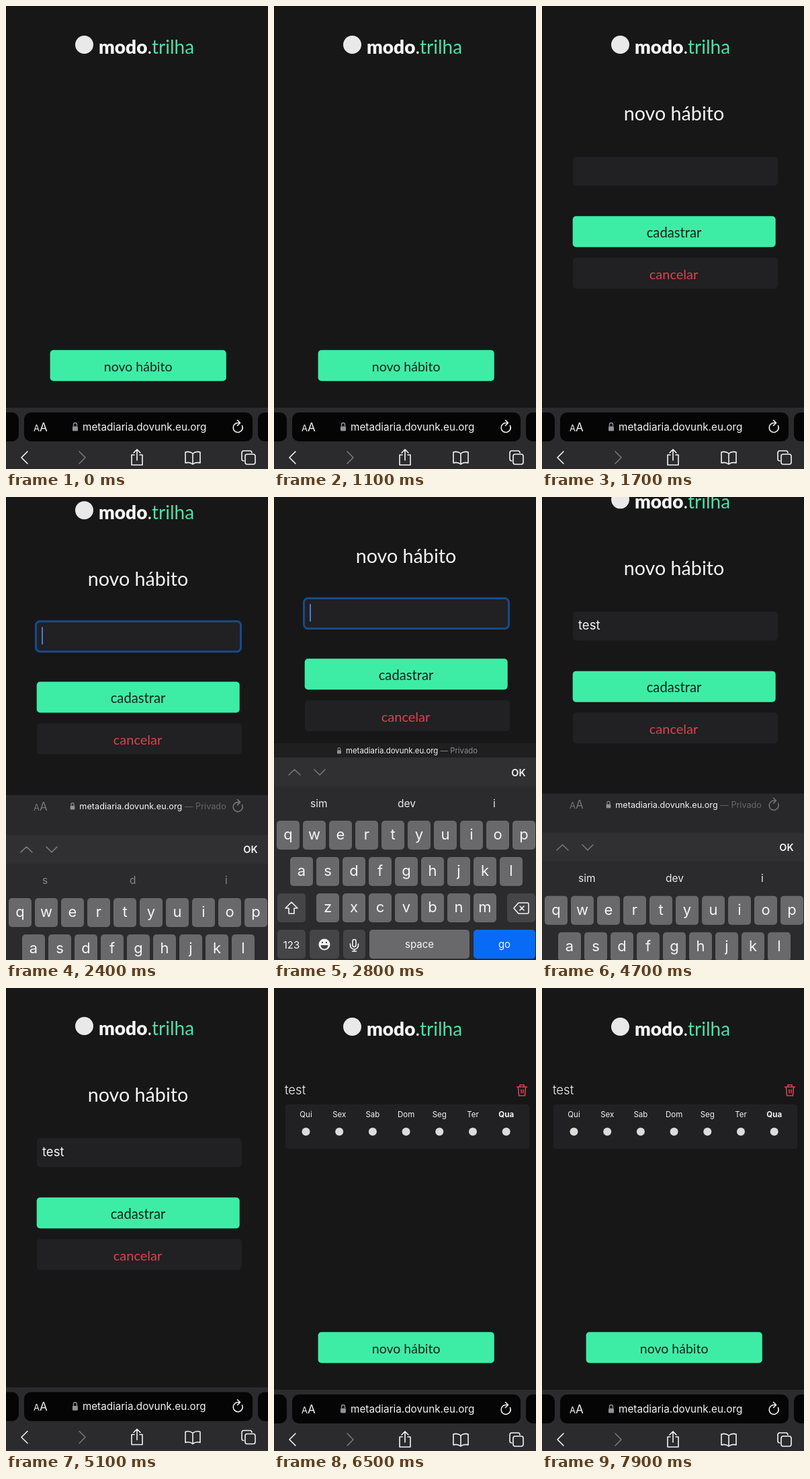
An HTML page that plays this animation: 390 px wide and 688 px high, repeating every 8000 ms.

```html
<!DOCTYPE html>
<html lang="pt">
<head>
<meta charset="utf-8">
<title>novo hábito</title>
<style>
html, body { margin: 0; width: 100%; height: 100%; overflow: hidden; background: #171718; }
svg { display: block; width: 100%; height: 100%; }
text { font-family: Inter, Roboto, sans-serif; fill: #f4f4f4; white-space: pre; }
.lato { font-family: Lato, "Open Sans", sans-serif; }
.mid { text-anchor: middle; }
.line { fill: none; stroke: #f4f4f4; stroke-width: 1.6; stroke-linecap: round; stroke-linejoin: round; }
.dim { stroke: #77777a; }
.red { stroke: #d8434f; }
</style>
</head>
<body>
<svg viewBox="0 0 390 688">
  <rect width="390" height="688" fill="#171718"/>
  <g id="page">
    <circle cx="116.5" cy="57.5" r="13.5" fill="#e9e9ea"/>
    <text class="lato" x="138" y="71" font-size="28"><tspan font-weight="900">modo</tspan>.<tspan fill="#4be0a8">trilha</tspan></text>
    <g id="home"></g>
    <g id="list"></g>
    <g id="form"></g>
  </g>
  <g id="bar">
    <rect id="barBack" y="597" width="390" height="330" fill="#2b2b2d"/>
    <g id="pill" fill="#050505">
      <rect x="-20" y="604" width="39" height="43" rx="10"/>
      <rect x="27" y="604" width="340" height="43" rx="10"/>
      <rect x="375" y="604" width="40" height="43" rx="10"/>
    </g>
    <g id="tools" class="line">
      <path d="M32 662l-9 9 9 9"/>
      <path class="dim" d="M109 662l9 9-9 9"/>
      <path d="M191 667h-4v15h16v-15h-4M195 675v-16m-5 5l5-5 5 5"/>
      <path d="M278 665q-5-4-11-2v16q6-2 11 2 5-4 11-2v-16q-6-2-11 2v16"/>
      <rect x="356" y="666" width="15" height="15" rx="3"/>
      <path d="M354 676q-3 0-3-3v-9q0-3 3-3h9q3 0 3 3"/>
    </g>
  </g>
  <g id="address">
    <g id="ends">
      <text x="41" y="6" font-size="13">A<tspan font-size="17">A</tspan></text>
      <path class="line" d="M351.500-2a7 7 0 1 1-6-4h3m-4-4l4 4-4 4"/>
    </g>
    <g id="lock">
      <rect x="-4" y="-1" width="8" height="7" rx="1.200" fill="#929296"/>
      <path d="M-2.500-1v-2.500a2.500 2.500 0 0 1 5 0V-1" fill="none" stroke="#929296" stroke-width="1.400"/>
    </g>
    <text id="url">metadiaria.dovunk.eu.org<tspan id="private" fill="#8b8b8f"> — Privado</tspan></text>
  </g>
  <g id="keyboard"></g>
</svg>
<script>
const $ = id => document.getElementById(id);
const rect = (x, y, w, h, fill, r = 5) =>
  `<rect x="${x}" y="${y}" width="${w}" height="${h}" rx="${r}" fill="${fill}"/>`;
const text = (x, y, size, str, attrs = 'class="mid"') =>
  `<text x="${x}" y="${y}" font-size="${size}" ${attrs}>${str}</text>`;
const label = fill => `class="mid lato" style="fill:${fill}"`;
const line = (d, extra = '') => `<path class="line ${extra}" d="${d}"/>`;

const GREEN = '#3eeda5', PANEL = '#212022', INK = '#17201c', KEY = '#69696b', DARK_KEY = '#454547';

$('home').innerHTML = rect(65.6, 511.3, 262.2, 46, GREEN) + text(196.7, 543, 19.5, 'novo hábito', label(INK));

$('list').innerHTML = text(16, 158, 18.5, 'test', 'font-weight="300"') +
  line('M361.500 147h15m-10.500 0v-3h6v3m-8.500 0l1 13h9l1-13m-6.500 4v5m3-5v5', 'red') +
  rect(17, 173, 363, 66, PANEL, 4) +
  ['Qui', 'Sex', 'Sab', 'Dom', 'Seg', 'Ter', 'Qua'].map((day, i) => {
    const x = 47.5 + i * 49.7;
    return text(x, 192, 11.5, day, `class="mid" font-weight="${i == 6 ? 700 : 400}"`) +
      `<circle cx="${x}" cy="213.5" r="6" fill="#dcdcdc"/>`;
  }).join('');

$('form').innerHTML = text(196.5, 170, 28.7, 'novo hábito', label('#f4f4f4')) +
  rect(46, 224, 305, 43, PANEL) +
  '<rect id="ring" x="44.5" y="222.500" width="305" height="45" rx="6" fill="#212022" stroke="#174b8a" stroke-width="3"/>' +
  text(54, 251, 18.5, '', 'id="typed"') +
  '<rect id="caret" y="231" width="2" height="26" fill="#4a78d8"/>' +
  rect(45.7, 312.3, 302, 46, GREEN) + text(196.5, 344, 20.2, 'cadastrar', label(INK)) +
  rect(46, 374, 305, 46, PANEL) + text(196, 405.5, 20, 'cancelar', label('#d8434f'));

// Keyboard in its open position
const row = (letters, center, y) => [...letters].map((c, i) => {
  const x = center + i * 39;
  return rect(x - 17, y, 34, 43, KEY) + text(x, y + 28, 22, c);
}).join('');

$('keyboard').innerHTML = rect(0, 387, 390, 301, '#2b2b2d', 0) + rect(0, 387, 390, 43, '#303032', 0) +
  line('M22 413l8.500-8 8.500 8M60 405l8 8 8-8', 'dim') +
  text(364, 414.5, 14.5, 'OK', 'class="mid" font-weight="600"') +
  '<g id="hints"></g>' +
  row('qwertyuiop', 21, 481) + row('asdfghjkl', 41, 535) + row('zxcvbnm', 80, 589) +
  rect(5, 589, 42, 43, DARK_KEY) + line('M26 602l-9 9h5v8h8v-8h5z') +
  rect(347, 589, 42, 43, DARK_KEY) + line('M364 603h13q2 0 2 2v12q0 2-2 2h-13l-7-8zM366 608l6 6m0-6l-6 6') +
  rect(5, 643, 42, 43, DARK_KEY) + text(26, 670.5, 15, '123') +
  rect(53, 643, 44, 43, DARK_KEY) + '<circle cx="75" cy="665" r="8.500" fill="#f4f4f4"/>' +
  `<path d="M69.500 666h11a5.500 5.500 0 0 1-11 0zM71 661h2v2h-2zM77 661h2v2h-2z" fill="${DARK_KEY}"/>` +
  rect(103, 643, 33, 43, DARK_KEY) +
  line('M117 660a2.500 2.500 0 0 1 5 0v6a2.500 2.500 0 0 1-5 0zM113.500 664v2a6 6 0 0 0 12 0v-2M119.500 672v3m-3 0h6') +
  rect(142, 643, 149, 43, KEY) + text(216.5, 669.5, 15, 'space') +
  rect(297, 643, 92, 43, '#086bf5') + text(343, 669.5, 15, 'go');

const LOOP = 8000, FORM_IN = 1200, FORM_OUT = 5800, OPEN = 2250, CLOSE = 4615, PAGE_LAG = 30;
const KEY_TIMES = [3900, 4060, 4240, 4400];
const mix = (a, b, p) => a + (b - a) * p;
const ease = (t, start, length) => 1 - (1 - Math.min(1, Math.max(0, (t - start) / length))) ** 3;
const raised = t => ease(t, OPEN, 550) - ease(t, CLOSE, 600);
const show = (id, on) => $(id).style.display = on ? '' : 'none';
const fade = (id, alpha) => $(id).style.opacity = Math.max(0, alpha);
const move = (id, x, y, s = 1) => $(id).setAttribute('transform', `translate(${x} ${y}) scale(${s})`);

function draw(t) {
  const inForm = t >= FORM_IN && t < FORM_OUT;
  show('home', !inForm);
  show('list', t >= FORM_OUT);
  show('form', inForm);

  const k = raised(t);
  const q = k ** 0.84;
  move('page', 0, -72 * raised(t - PAGE_LAG));
  move('keyboard', 0, 301 * (1 - k));
  show('keyboard', k > 0.001);

  const focused = t >= OPEN && t < CLOSE;
  const typed = 'test'.slice(0, KEY_TIMES.filter(time => t >= time).length);
  show('ring', focused);
  show('caret', focused);
  $('typed').textContent = typed;
  $('caret').setAttribute('x', 53 + (typed && $('typed').getComputedTextLength() + 1));

  // The address bar shrinks as it rides up on the keyboard
  move('bar', 0, -231 * q);
  fade('barBack', 1 - 0.6 * k ** 4);
  fade('pill', 1 - 2 * k);
  fade('tools', 1 - 3 * k);
  move('address', 0, mix(625.5, 377, q));
  fade('ends', 1 - k);
  move('lock', mix(103, 97, q), 0, mix(1, 0.75, q));
  const size = mix(15.3, 11.4, q);
  $('url').setAttribute('font-size', size);
  $('url').setAttribute('x', mix(114, 107, q));
  $('url').setAttribute('y', size * 0.36);
  fade('private', k);
  show('private', k > 0.1);

  const ready = t > 2550;
  $('hints').innerHTML = ['sim', 'dev', 'i'].map((word, i) =>
    text([54, 184, 326][i], 460.5, 15.5, ready ? word : word[0], `opacity="${ready ? 0.95 : 0.45}"`)).join('');
}

const begin = performance.now();
function tick() {
  draw((performance.now() - begin) % LOOP);
  requestAnimationFrame(tick);
}
tick();
</script>
</body>
</html>
```
